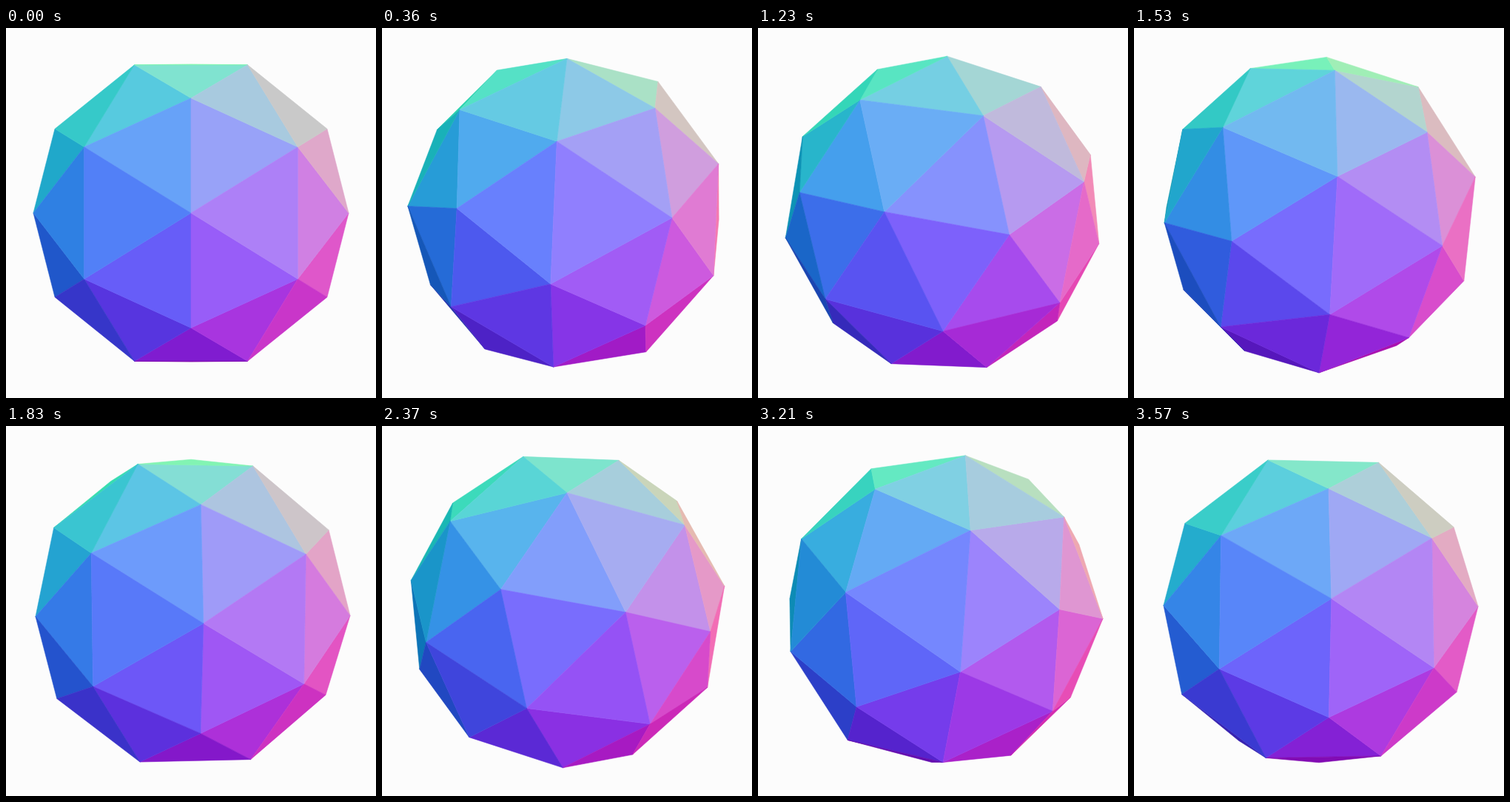
Animation, 500 px wide and 500 px high, one loop 3.6 s. Source, as an HTML page with a canvas:

```html
<!DOCTYPE html>
<html>
<head>
<meta charset="utf-8">
<style>
  html, body { margin: 0; height: 100%; overflow: hidden; background: #fcfcfc; }
  canvas { display: block; }
</style>
</head>
<body>
<canvas id="stage" width="500" height="500"></canvas>
<script>
const ctx = document.getElementById('stage').getContext('2d');
const SIZE = 500, STEP = 30, STEPS = 120;
const CAMERA_Z = 8 / 3;
const FOCAL = SIZE / 2 / Math.tan(25 * Math.PI / 180);

const sub = (a, b) => a.map((v, i) => v - b[i]);
const dot = (a, b) => a[0] * b[0] + a[1] * b[1] + a[2] * b[2];
const cross = (a, b) => [
  a[1] * b[2] - a[2] * b[1],
  a[2] * b[0] - a[0] * b[2],
  a[0] * b[1] - a[1] * b[0]
];
const unit = a => a.map(v => v / Math.hypot(...a));
const middle = (a, b) => unit(a.map((v, i) => v + b[i]));

// Icosahedron whose faces are each split into four on the unit sphere
function buildSphere() {
  const phi = (1 + Math.sqrt(5)) / 2, corners = [], faces = [];
  for (const s of [-1, 1]) for (const t of [-phi, phi])
    corners.push([s, t, 0], [0, s, t], [t, 0, s]);
  const adjacent = (a, b) => Math.hypot(...sub(a, b)) < 2.1;
  corners.forEach((a, i) => corners.forEach((b, j) => corners.forEach((c, k) => {
    if (!(i < j && j < k && adjacent(a, b) && adjacent(b, c) && adjacent(a, c))) return;
    const [p, q, r] = [a, b, c].map(unit);
    const pq = middle(p, q), qr = middle(q, r), rp = middle(r, p);
    faces.push([p, pq, rp], [q, qr, pq], [r, rp, qr], [pq, qr, rp]);
  })));
  return faces;
}

// Turn by -angle about y, then by +angle about x
function rotate([x, y, z], angle) {
  const c = Math.cos(angle), s = Math.sin(angle);
  const depth = x * s + z * c;
  return [x * c - z * s, y * c - depth * s, y * s + depth * c];
}

function project([x, y, z]) {
  const scale = FOCAL / (CAMERA_Z - z);
  return [SIZE / 2 + x * scale, SIZE / 2 - y * scale];
}

const sphere = buildSphere();
ctx.lineWidth = 0.6;
ctx.lineJoin = 'round';

function draw() {
  const step = Math.floor(performance.now() / STEP + 0.02) % STEPS;
  const angle = step / STEPS * 2 * Math.PI;
  ctx.fillStyle = '#fcfcfc';
  ctx.fillRect(0, 0, SIZE, SIZE);
  for (const face of sphere) {
    const [a, b, c] = face.map(v => rotate(v, angle));
    let normal = unit(cross(sub(b, a), sub(c, a)));
    if (dot(normal, a) < 0) normal = normal.map(v => -v);
    if (dot(normal, sub([0, 0, CAMERA_Z], a)) <= 0) continue;
    const color = normal.map(v => Math.round((v + 1) * 127.5));
    ctx.fillStyle = ctx.strokeStyle = `rgb(${color})`;
    ctx.beginPath();
    for (const v of [a, b, c]) ctx.lineTo(...project(v));
    ctx.closePath();
    ctx.fill();
    ctx.stroke();
  }
  requestAnimationFrame(draw);
}
draw();
</script>
</body>
</html>
```
